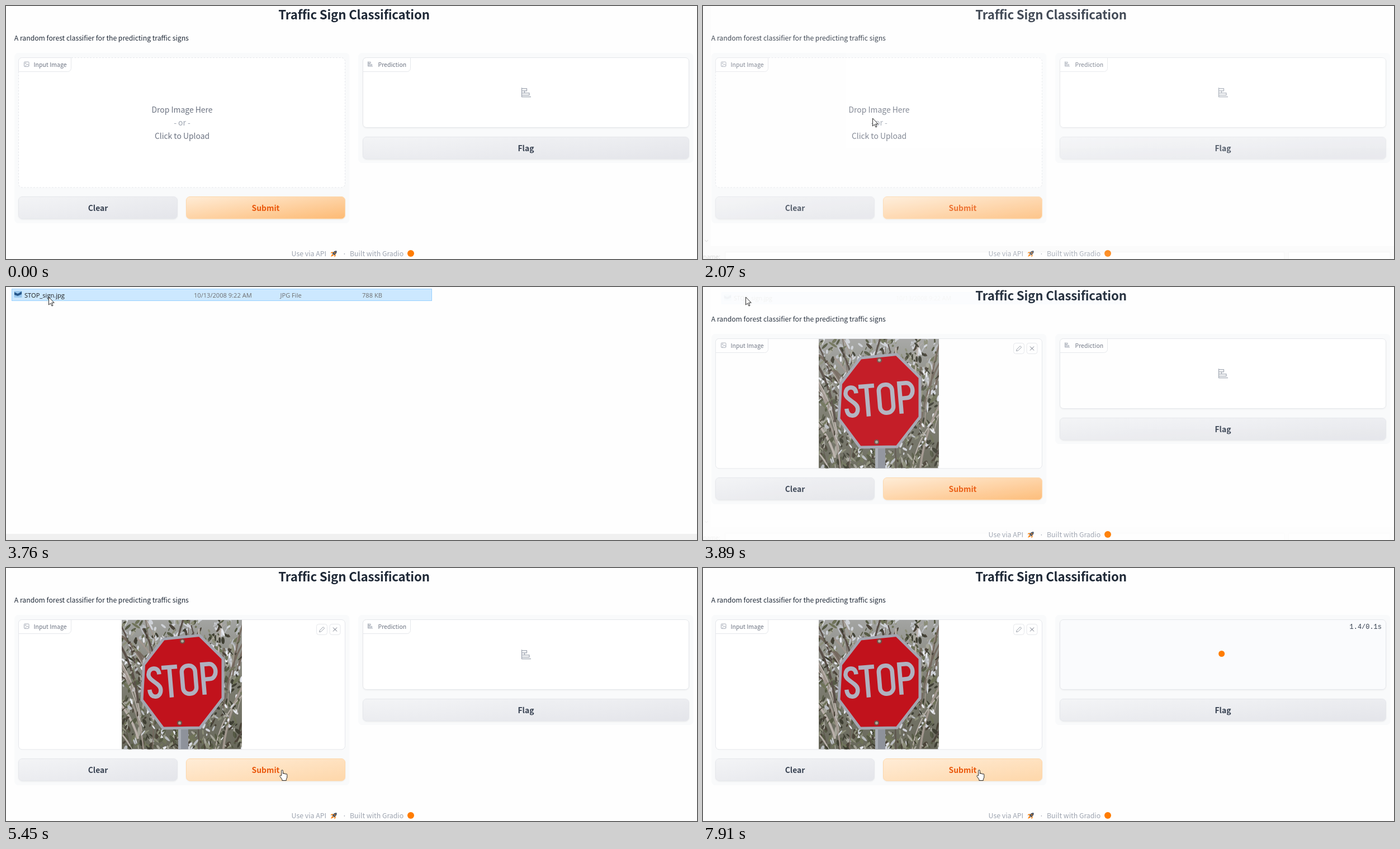
An HTML page that plays this animation: 1236x453 px, repeating every 8000 ms.

```html
<!DOCTYPE html>
<html lang="en">
<head>
<meta charset="utf-8">
<title>Traffic Sign Classification</title>
<style>
  html, body { margin: 0; width: 100%; height: 100%; overflow: hidden; background: #fefefe; }
  svg { display: block; }
  text { font-family: "Noto Sans CJK JP", "Noto Sans CJK SC", "Noto Sans CJK", "Open Sans", sans-serif; white-space: pre; }
  .b { font-weight: 600; }
  .m { text-anchor: middle; }
  .win text { font-family: "Open Sans", "Noto Sans", sans-serif; font-size: 11.1px; }
  .timer { font-family: "Liberation Mono", monospace; font-size: 11.95px; }
  .soft { filter: drop-shadow(0 1px 1px rgba(0, 0, 0, .05)); }
  .line { fill: none; stroke: #9ca3af; }
</style>
</head>
<body>
<svg id="stage" width="1236" height="453" viewBox="0 0 1236 453"></svg>
<script>
const LOOP = 8000;
const stage = document.getElementById('stage');

const rect = (x, y, w, h, r, attrs) =>
  `<rect x="${x}" y="${y}" width="${w}" height="${h}" rx="${r}" ${attrs}/>`;
const text = (x, y, size, fill, str, cls = '', extra = '') =>
  `<text x="${x}" y="${y}" font-size="${size}" fill="${fill}" class="${cls}" ${extra}>${str}</text>`;
const gradient = (id, from, to) =>
  `<linearGradient id="${id}" x1="0" y1="0" x2="1" y2="1"><stop stop-color="${from}"/><stop offset="1" stop-color="${to}"/></linearGradient>`;
const button = (x, y, w, label, fill, border, ink, id = '') =>
  rect(x, y, w, 39.5, 6.5, `id="${id}" class="soft" fill="url(#${fill})" stroke="${border}"`) +
  text(x + w / 2, y + 25.4, 13.9, ink, label, 'b m');

// Small corner label of a block
const tab = (x, w, label) =>
  `<path d="M${x} 117.5h${w - 6}a6 6 0 0 0 6 -6V92.5H${x + 6}a6 6 0 0 0 -6 6Z" fill="#fff" stroke="#e5e7eb"/>` +
  text(x + 27, 109, 10.5, '#6b7280', label);

const barIcon = (x, y, k, width) =>
  `<g transform="translate(${x} ${y}) scale(${k})" class="line" stroke-width="${width}">
    <path d="M0 0V16.300H16.500M0 1.500H9V5.500H0M0 9.500H13.500V13.300H0M0 5.500H5V9.500"/></g>`;

// Seeded random numbers for the foliage
function seeded(seed) {
  return () => (seed = (seed * 16807) % 2147483647) / 2147483647;
}

function photo() {
  const rnd = seeded(77);
  const pick = list => list[Math.floor(rnd() * list.length)];
  const X = 207, Y = 93, W = 215, H = 231.5;
  const leaves = (count, size) => {
    let out = '';
    for (let i = 0; i < count; i++) {
      const x = (X + rnd() * W).toFixed(1), v = rnd(), y = (Y + v * H).toFixed(1);
      const fill = rnd() < .42 - v * .3
        ? pick(['#e6e8ee', '#cfd2d8', '#b9bcc0'])
        : pick(['#3f3f33', '#565a45', '#6f7359', '#8b8d79', '#a6a59a', '#4b4439']);
      out += `<ellipse cx="${x}" cy="${y}" rx="${(size * (.5 + rnd())).toFixed(1)}" ry="${(size * (.2 + rnd() * .3)).toFixed(1)}"
        transform="rotate(${(30 + rnd() * 120).toFixed()} ${x} ${y})" fill="${fill}"/>`;
    }
    return out;
  };
  // Boughs fan out from the foot of the picture
  const boughs = count => {
    let out = '';
    for (let i = 0; i < count; i++) {
      const x = X + rnd() * W, y = Y + H * (.35 + rnd() * .75);
      const dx = (x - X - W / 2) * .7 + (rnd() - .5) * 90, dy = -60 - rnd() * 90;
      out += `<path d="M${x.toFixed(1)} ${y.toFixed(1)}q${(dx * .2).toFixed(1)} ${(dy * .6).toFixed(1)} ${dx.toFixed(1)} ${dy.toFixed(1)}"
        fill="none" stroke="${pick(['#5a5049', '#75695f', '#a0968e', '#b9b0aa'])}" stroke-width="${(.8 + rnd() * 3.5).toFixed(1)}"/>`;
    }
    return out;
  };
  const bolt = (x, y) => `<circle cx="${x}" cy="${y}" r="4.5" fill="#6f5148"/><circle cx="${x}" cy="${y}" r="2.5" fill="#b3a79b"/>`;
  return `<svg x="${X}" y="${Y}" width="${W}" height="${H}" viewBox="${X} ${Y} ${W} ${H}">
    ${rect(X, Y, W, H, 0, 'fill="url(#wood)"')}${leaves(420, 7)}${boughs(48)}${leaves(480, 4)}
    ${rect(308, 280, 18, 45, 0, 'fill="#8e929b"')}${rect(308, 280, 5, 45, 0, 'fill="#a9adb6"')}
    <path d="M282 127L346 120.500 388 162V233L347 286 281 287 243 236 246.500 173Z" fill="#c1121c" stroke="#a3a5b0" stroke-width="5"/>
    <g transform="rotate(-4.800 315 201)" fill="none" stroke="#b0b1bf" stroke-width="7.500">
      <path d="M275 187C275 179 271 175.800 266 175.800 260 175.800 256 180 256 187 256 197 275.500 203 275.500 214 275.500 222 271 226.200 265.500 226.200 259.500 226.200 256 222 255.500 213"/>
      <path d="M280 175.800H308M294 175.800V230M353 230V175.800H365a11 13.500 0 0 1 0 27H353"/>
      ${rect(315.5, 175.8, 24, 50.4, 11, '')}
    </g>
    ${bolt(315.5, 131)}${bolt(310.5, 277.5)}
  </svg>`;
}

const grey = ['grey', '#e5e7eb', '#374151'];
stage.innerHTML = `
<defs>
  ${gradient('grey', '#f3f4f6', '#e4e5ea')}
  ${gradient('warm', '#ffecd6', '#fdba74')}
  ${gradient('pale', '#ffecd6', '#fed7aa')}
  <linearGradient id="wood" x1="0" y1="0" x2="0" y2="1"><stop stop-color="#a3a4a2"/><stop offset=".5" stop-color="#7d7d71"/><stop offset="1" stop-color="#68685b"/></linearGradient>
</defs>
<g>
  ${rect(0, 0, 1236, 453, 0, 'fill="#fefefe"')}
  ${text(622.5, 23.5, 22.3, '#1f2937', 'Traffic Sign Classification', 'b m', 'letter-spacing="-.2"')}
  ${text(14.8, 61.6, 12.2, '#1f2937', 'A random forest classifier for the predicting traffic signs')}
  ${rect(15, 84, 599.5, 305, 7, 'fill="#f9fafb"')}
  ${rect(630, 84, 599.5, 197, 7, 'fill="#f9fafb"')}
  ${rect(22.5, 92.5, 584, 232.5, 6.5, 'id="drop" fill="#fff" stroke="#e5e7eb"')}
  <g id="prompt">
    ${text(315, 191, 13.9, '#6b7280', 'Drop Image Here', 'm')}
    ${text(315, 214, 13.9, '#9ca3af', '- or -', 'm')}
    ${text(315, 237.5, 13.9, '#6b7280', 'Click to Upload', 'm')}
  </g>
  <g id="loaded">
    ${photo()}
    ${rect(555.5, 100.5, 19, 19, 4, 'fill="#fff" stroke="#e5e7eb"')}
    ${rect(579, 100.5, 19, 19, 4, 'fill="#fff" stroke="#e5e7eb"')}
    <path d="M560.500 114.500L561.300 111.600 567.300 105.600 569.600 107.900 563.600 113.900Z" fill="none" stroke="#8b919c" stroke-width=".9"/>
    <path d="M585 106.500l7 7m0 -7l-7 7" stroke="#6b7280" stroke-width="1"/>
  </g>
  ${tab(22.5, 94, 'Input Image')}
  <g class="line" stroke-width=".9">${rect(32.5, 100, 8.5, 8.5, 1.2, '')}<circle cx="35" cy="102.500" r=".8"/><path d="M33.500 108L38 104 41 106.500"/></g>
  ${button(22.5, 341.5, 284, 'Clear', ...grey)}
  ${button(322.5, 341.5, 284, 'Submit', 'warm', '#fed7aa', '#ea580c', 'submit')}
  ${rect(638.5, 92.5, 583, 125, 6.5, 'id="result" class="soft" fill="#fff" stroke="#e5e7eb"')}
  <g id="idle">
    ${tab(638.5, 85, 'Prediction')}
    ${barIcon(647.5, 99.5, .52, 1.7)}
    ${barIcon(922.5, 146.3, 1, 1.2)}
  </g>
  <g id="busy">
    <circle id="spin" cy="153.500" r="5.500" fill="#ff7c00"/>
    <text id="timer" class="timer" x="1156.600" y="109" fill="#374151"></text>
  </g>
  ${button(638.5, 234.5, 583, 'Flag', ...grey)}
  ${text(510.6, 447.6, 12.3, '#9ca3af', 'Use via API')}
  <g transform="translate(587 443) rotate(45)">
    <path d="M-2.500 1.500L-5 4.500V1.500L-2.500 -1ZM2.500 1.500L5 4.500V1.500L2.500 -1ZM-2 3H2L0 8.500Z" fill="#ff7c00"/>
    <path d="M-2.500 2.500V-3Q0 -9.500 2.500 -3V2.500Z" fill="#4b5563"/>
    <circle cy="-1.500" r="1.100" fill="#ff7c00"/>
  </g>
  ${text(605.5, 447.6, 12.3, '#9ca3af', '·', 'm')}
  ${text(615, 447.6, 12.3, '#9ca3af', 'Built with Gradio')}
  <circle cx="724" cy="443" r="6" fill="#ff7c00"/>
</g>
<g id="dialog" class="win">
  ${rect(-200, -200, 1700, 900, 0, 'fill="#fefefe"')}
  ${rect(-27, -200, 17, 642, 0, 'fill="#f0f0f0"')}
  <path d="M-21 431l3 3 3 -3" fill="none" stroke="#606060" stroke-width="1.300"/>
  ${rect(-200, 442, 1700, 200, 0, 'fill="#f0f0f0"')}
  ${rect(17, 453.5, 1045, 20, 0, 'fill="#fff" stroke="#ccc"')}
  ${rect(1070, 453.5, 190, 20, 0, 'fill="#fff" stroke="#ccc"')}
  ${text(8, 467, 11, '#222', 'File name:', '', 'text-anchor="end"')}
  <g id="row">
    ${rect(10.5, 3.5, 751, 21, 0, 'id="mark"')}
    ${rect(14.5, 7, 14, 12, 1, 'fill="#9cc9ee"')}
    <path d="M15 9L21 12 28 8V13L21 16 15 14Z" fill="#27588c"/>
    ${text(33, 18.5, 11.1, '#1a1a1a', 'STOP_sign.jpg')}
    ${text(336, 18.5, 11.1, '#6d6d6d', '10/13/2008 9:22 AM')}
    ${text(490.5, 18.5, 11.1, '#6d6d6d', 'JPG File')}
    ${text(637, 18.5, 11.1, '#6d6d6d', '788 KB')}
  </g>
</g>
<g id="cursor">
  <circle id="click" r="11.500" fill="#ff0" fill-opacity=".47"/>
  <path id="arrow" d="M.500 0V14L3.700 11 6 16 8 15.100 5.800 10.200H10.200Z" fill="#fff" stroke="#111" stroke-width=".9"/>
  <path id="hand" d="M-1.400 9.500V1.200a1.400 1.400 0 0 1 2.800 0V6.500a1.300 1.300 0 0 1 2.600 .4 1.300 1.300 0 0 1 2.500 .6 1.200 1.200 0 0 1 2.300 .8V13L7.300 16.200V18.500H-.2V16.600L-3.900 11.200C-4.700 9.800 -3 8.400 -1.400 10Z" fill="#fff" stroke="#111" stroke-width=".9"/>
</g>`;

const el = {};
stage.querySelectorAll('[id]').forEach(n => { if (n.id) el[n.id] = n; });
const show = (node, on) => { node.style.display = on ? '' : 'none'; };
const set = (node, name, value) => node.setAttribute(name, value);

const smoother = p => p * p * p * (p * (p * 6 - 15) + 10);
const smooth = p => p * p * (3 - 2 * p);
const easeOut = p => 1 - (1 - p) ** 1.6;

// Pointer moves: start, last step, step count, from, to, easing
const moves = [
  [790, 1400, 10, [740, -3], [303, 201], smoother],
  [2590, 3350, 12, [303.5, 201], [76, 18], smoother],
  [4280, 5030, 12, [76, 18], [459, 304], smooth],
  [5100, 5450, 6, [459, 304], [494, 362], easeOut]
];

function pointer(t) {
  let at = null;
  for (const [from, to, n, a, b, ease] of moves) {
    if (t < from) break;
    const step = Math.min(n, Math.floor((t - from) / (to - from) * (n - 1) + 1e-6) + 1);
    const p = ease(step / n);
    at = [a[0] + (b[0] - a[0]) * p, a[1] + (b[1] - a[1]) * p];
  }
  return at;
}

// Start, opacity and scale of the file window, in hard steps
const windowSteps = [
  [0, 0, 1], [2070, .16, .957], [2140, .45, .975], [2210, .74, .988], [2270, .92, .996],
  [2340, 1, 1], [3830, .5, .98], [3890, .05, .957], [3960, 0, 1]
];

function draw(t) {
  const loaded = t >= 3830, busy = t >= 6590;
  const [, alpha, scale] = windowSteps.filter(s => t >= s[0]).pop();
  show(el.prompt, !loaded);
  show(el.loaded, loaded);
  set(el.drop, 'stroke-dasharray', loaded ? 'none' : '3 2.5');

  show(el.dialog, alpha > 0);
  set(el.dialog, 'opacity', alpha);
  set(el.dialog, 'transform', `translate(545 153) scale(${scale}) translate(-545 -153)`);
  show(el.row, t >= 2340);

  const at = pointer(t);
  show(el.cursor, at);
  const [x, y] = at || [0, 0];
  set(el.cursor, 'transform', `translate(${x.toFixed(2)} ${y.toFixed(2)})`);
  const overDrop = t < 1800 && x > 23 && x < 607 && y > 92;
  const overSubmit = loaded && y > 341;
  show(el.hand, overDrop || overSubmit);
  show(el.arrow, !(overDrop || overSubmit));
  show(el.click, (t >= 1600 && t < 1800) || (t >= 3480 && t < 3690) || (t >= 6440 && t < 6590));
  set(el.submit, 'fill', overSubmit ? 'url(#pale)' : 'url(#warm)');

  const picked = t >= 3480;
  show(el.mark, picked || (at && y < 25));
  set(el.mark, 'fill', picked ? '#cce8ff' : '#e5f3ff');
  set(el.mark, 'stroke', picked ? '#99d1ff' : '#e5f3ff');

  show(el.idle, !busy);
  show(el.busy, busy);
  set(el.result, 'fill', busy ? '#fafbfd' : '#fff');
  if (busy) {
    const s = Math.floor((t - 6590) / 82.5 + 1e-6) * .0825;
    el.timer.textContent = (s + .05).toFixed(1) + '/0.1s';
    set(el.spin, 'cx', (929 + 4 * Math.sin(s * 4.5)).toFixed(2));
  }
}

const begin = performance.now();
function frame() {
  draw((performance.now() - begin) % LOOP);
  requestAnimationFrame(frame);
}
draw(0);
requestAnimationFrame(frame);
</script>
</body>
</html>
```
